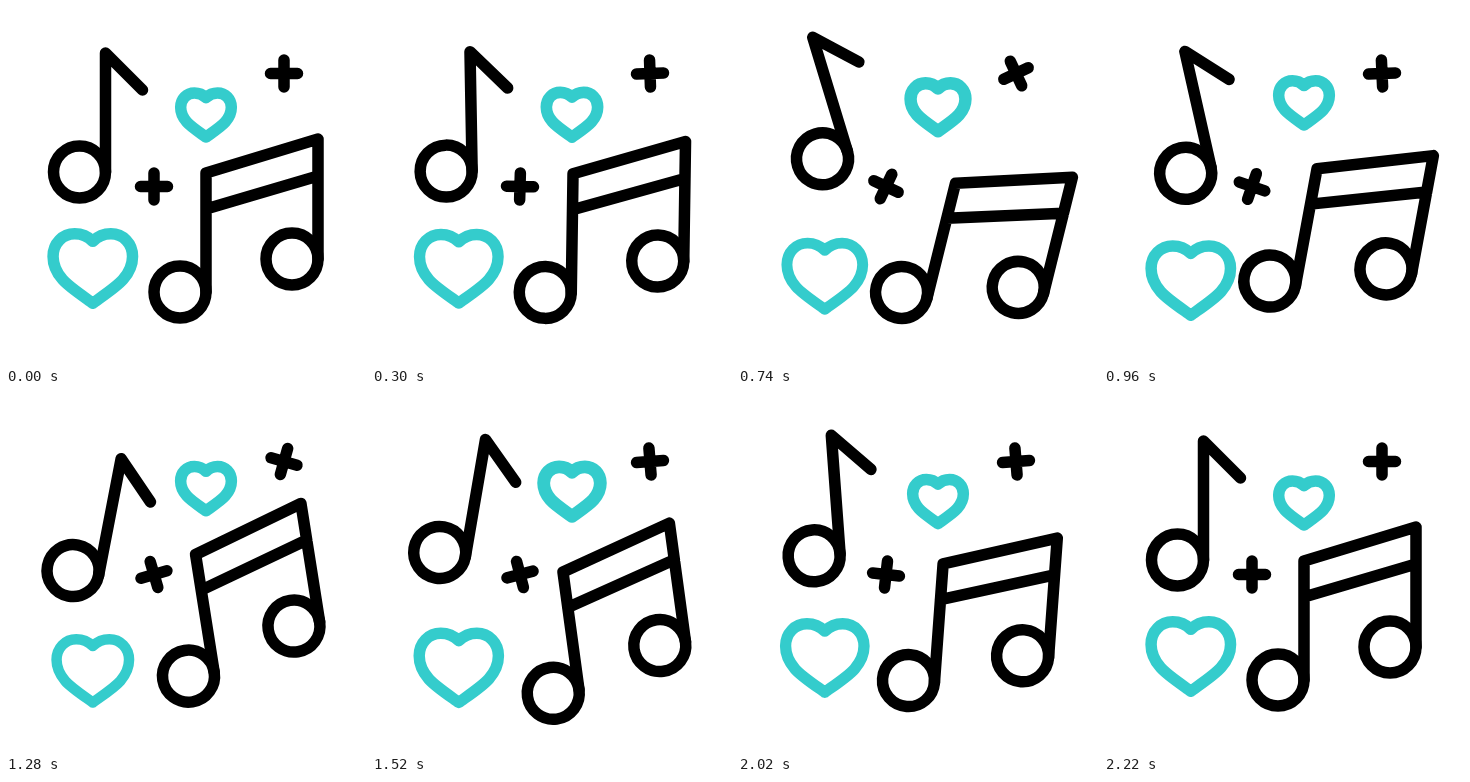
An HTML page for the animation above (2.4 s loop, 360 by 360 pixels).

```html
<!DOCTYPE html>
<html lang="en">
<head>
<meta charset="utf-8">
<title>Dancing notes</title>
<style>
  html, body { margin: 0; width: 100%; height: 100%; overflow: hidden; background: #fff; }
  svg { display: block; width: 100%; height: 100%; }
  .ink, .heart { fill: none; stroke: #000; stroke-width: 11.5; stroke-linecap: round; stroke-linejoin: round; }
  .heart { stroke: #34cccc; }
</style>
</head>
<body>
<svg viewBox="0 0 360 360">
  <defs>
    <path id="plus" d="M-13.5 0H13.5M0 -13.5V13.5"/>
  </defs>
  <g class="heart">
    <path id="smallHeart"/>
    <path id="bigHeart"/>
  </g>
  <g class="ink">
    <g id="smallNote">
      <circle cx="73.5" cy="166" r="26"/>
      <path d="M99.5 166V47L136.5 84"/>
    </g>
    <g id="bigNote">
      <circle cx="174" cy="286" r="26"/>
      <circle cx="286" cy="253" r="26"/>
      <path d="M200 286V167L312 133V253M200 203L312 170"/>
    </g>
    <use id="topPlus" href="#plus"/>
    <use id="midPlus" href="#plus"/>
  </g>
</svg>
<script>
const LOOP = 2400, START = 220, MOVE = 2000;
const el = id => document.getElementById(id);
const ease = f => f * f * (3 - 2 * f);

// Eased value between [time, value] keys
function track(u, keys) {
  for (let i = 1; i < keys.length; i++) {
    const [t0, v0] = keys[i - 1], [t1, v1] = keys[i];
    if (u <= t1) return v0 + (v1 - v0) * ease((u - t0) / (t1 - t0));
  }
  return keys[keys.length - 1][1];
}

const quarters = (a, b, c, lead = 0) =>
  [[0, 0], [.25 - lead, a], [.5 - lead, b], [.75 - lead, c], [1, 0]];
const swing = (a, b, c) => [[0, 0], [.27, a], [.305, a], [.585, b], [.815, c], [1, 0]];
const pulse = (u, from, to) =>
  u > from && u < to ? (1 - Math.cos(2 * Math.PI * (u - from) / (to - from))) / 2 : 0;

const smallSwing = swing(-17, 14, -7.6), smallBob = quarters(-16.5, 15.5, -15);
const bigSwing = swing(14, -11.5, 7.5), bigBob = quarters(16, -14, 14.6, .01);
const topSpin = quarters(-26, 18, -14, .01);
const drift = [[0, 0], [.5, 14.5], [1, 0]];

function pose(id, dy, angle, x, y) {
  el(id).setAttribute("transform", `translate(0 ${dy}) rotate(${angle} ${x} ${y})`);
}

function spin(id, x, y, angle) {
  el(id).setAttribute("transform", `translate(${x} ${y}) rotate(${angle})`);
}

function heartPath(k) {
  const side = s => [[-6, 30, -23, 19, -30, 11], [-37, 3, -39.5, -4, -39.5, -12],
    [-39.5, -25, -30, -34.5, -18, -34.5], [-11, -34.5, -5, -32, 0, -27]]
    .map(c => "C" + c.map((v, i) => v * k * (i % 2 ? 1 : s)).join(" ")).join("");
  const tip = `M0 ${34.5 * k}`;
  return tip + side(1) + tip + side(-1);
}

function placeHeart(id, x, y, scale) {
  el(id).setAttribute("transform", `translate(${x} ${y}) scale(${scale})`);
}

el("smallHeart").setAttribute("d", heartPath(.641));
el("bigHeart").setAttribute("d", heartPath(1.006));

function draw(time) {
  const u = Math.min(1, Math.max(0, (time % LOOP - START) / MOVE));
  const smallAngle = track(u, smallSwing), rise = track(u, drift);
  pose("smallNote", track(u, smallBob), smallAngle, 89.5, 130.5);
  pose("bigNote", track(u, bigBob), track(u, bigSwing), 230, 236);
  spin("topPlus", 278, 67.5, track(u, topSpin));
  spin("midPlus", 148, 180.5, -1.5 * smallAngle);
  const swell = .12 * (pulse(u, 0, .38) + pulse(u, .52, .8));
  const shrink = .09 * (pulse(u, 0, .35) + pulse(u, .36, .67)) + .02 * pulse(u, .67, 1);
  placeHeart("smallHeart", 200, 109 - rise, 1 + swell);
  placeHeart("bigHeart", 86.8, 262.5 + rise, 1 - shrink);
}

const begin = performance.now();
function frame() {
  draw(performance.now() - begin);
  requestAnimationFrame(frame);
}
frame();
</script>
</body>
</html>
```
